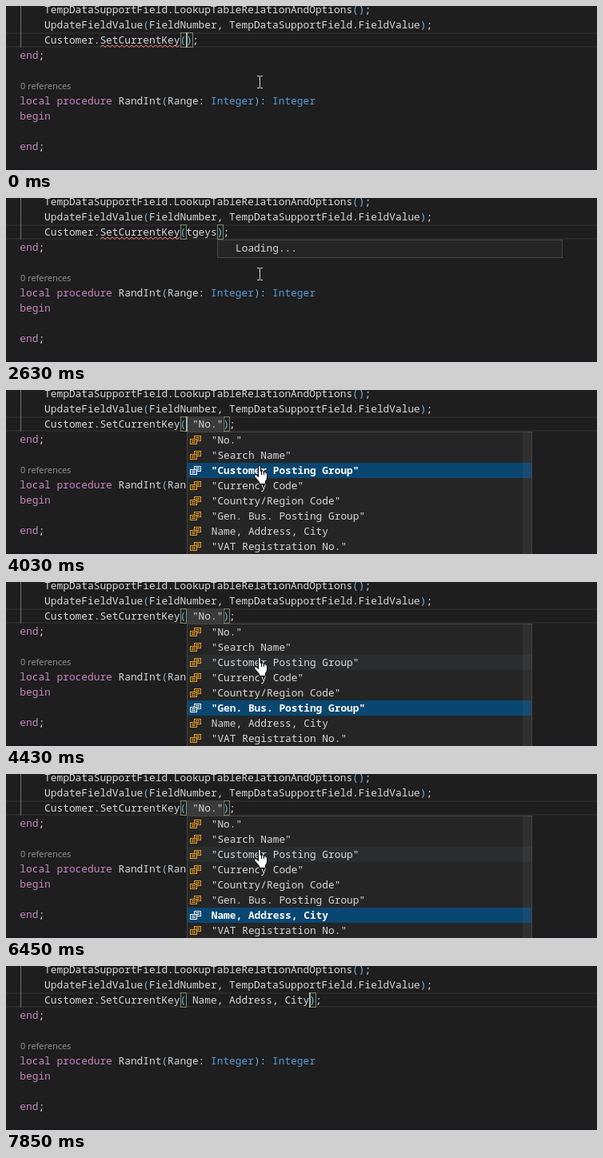
Write an HTML page with a canvas that moves like this. It is 739 px wide and 205 px high and loops after 8050 ms.

```html
<!DOCTYPE html>
<html lang="en">
<head>
<meta charset="utf-8">
<title>Code completion</title>
<style>
html, body { margin: 0; width: 100%; height: 100%; overflow: hidden; background: #1e1e1e; }
canvas { display: block; }
</style>
</head>
<body>
<canvas id="stage" width="739" height="205"></canvas>
<script>
const ctx = document.getElementById("stage").getContext("2d");
const LOOP = 8050, CHAR = 7.7, LEFT = 17.3, ROW = 19;
const MONO = '12.83px "Noto Sans Mono", "DejaVu Sans Mono", monospace';
const PLAIN = "#d8d8d8", KEYWORD = "#c586c0", TYPE = "#569cd6", PAREN = "#82b3dc";

const options = ['"No."', '"Search Name"', '"Customer Posting Group"', '"Currency Code"',
  '"Country/Region Code"', '"Gen. Bus. Posting Group"', "Name, Address, City",
  '"VAT Registration No."'];

// Each step changes part of the state at its time in ms.
const steps = [
  [0, { arg: "", caret: 27, on: true, squiggle: true, popup: "", selected: 0, pointer: "beam", at: [317, 87] }],
  [200, { arg: "t", caret: 28 }],
  [820, { on: false }],
  [1020, { arg: "tge", caret: 30, on: true }],
  [1220, { arg: "tgey", caret: 31 }],
  [1830, { on: false }],
  [2230, { arg: "tgeys", caret: 32, on: true, popup: "message" }],
  [2630, { on: false }],
  [3030, { arg: ' "No."', caret: 27, on: true, popup: "list", pointer: "hand", at: [310, 94] }],
  [3430, { on: false }],
  [3830, { selected: 1 }],
  [4030, { selected: 2, on: true, squiggle: false }],
  [4230, { selected: 3 }],
  [4430, { selected: 5, on: false }],
  [4830, { selected: 6, on: true }],
  [5030, { selected: 7 }],
  [5430, { selected: 6, on: false }],
  [5850, { on: true }],
  [6450, { on: false }],
  [6850, { pointer: "" }],
  [7050, { arg: " Name, Address, City", caret: 47, on: true, popup: "", pointer: "beam", at: [317, 87] }],
  [7450, { on: false }],
  [7650, { at: [399, 120] }],
  [7850, { on: true, pointer: "" }]
];

const stateAt = t => Object.assign({}, ...steps.filter(s => s[0] <= t).map(s => s[1]));
const colX = col => LEFT + col * CHAR;

function rect(x, y, w, h, color) {
  ctx.fillStyle = color;
  ctx.fillRect(x, y, w, h);
}

function frame(x, y, w, h, color) {
  ctx.strokeStyle = color;
  ctx.lineWidth = 1;
  ctx.strokeRect(x + 0.5, y + 0.5, w - 1, h - 1);
}

function polyline(points, color, width = 1) {
  ctx.beginPath();
  points.forEach(([x, y]) => ctx.lineTo(x, y));
  ctx.strokeStyle = color;
  ctx.lineWidth = width;
  ctx.stroke();
}

// Keeps every character on the monospace grid.
function mono(text, x, baseline, color, bold) {
  ctx.font = (bold ? "bold " : "") + MONO;
  ctx.fillStyle = color;
  [...text].forEach((c, i) => c !== " " && ctx.fillText(c, x + i * CHAR, baseline));
}

function colorOf(word) {
  if (/^(local|procedure|begin|end)$/.test(word)) return KEYWORD;
  if (word === "Integer") return TYPE;
  return /^[()]$/.test(word) ? PAREN : PLAIN;
}

function codeLine(text, top) {
  for (const m of text.matchAll(/\w+|[()]|[^\w()]+/g)) {
    mono(m[0], colX(m.index), top + 14, colorOf(m[0]));
  }
}

function bracketBox(col) {
  const x = Math.round(colX(col) + 0.3);
  rect(x, 33, 8, ROW, "rgba(0,100,0,0.1)");
  frame(x, 33, 8, ROW, "#808080");
}

function drawSquiggle() {
  const points = [];
  for (let x = 118, i = 0; x <= 218; x += 3, i++) points.push([x, i % 2 ? 49 : 51.5]);
  polyline(points, "#f48771");
}

function drawCode(s) {
  rect(0, 0, 739, 205, "#1e1e1e");
  rect(0, 202, 739, 3, "#1a1b1e");
  rect(0, 33, 739, 2, "#282828");
  rect(0, 50, 739, 2, "#282828");
  rect(18, 0, 1, 52, "#707070");

  if (s.arg.startsWith(' "')) rect(225, 33, 46, ROW, "#3a3a3a");
  if (s.squiggle) drawSquiggle();
  bracketBox(26);
  bracketBox(27 + s.arg.length);

  codeLine("    TempDataSupportField.LookupTableRelationAndOptions();", -5);
  codeLine("    UpdateFieldValue(FieldNumber, TempDataSupportField.FieldValue);", 14);
  codeLine(`    Customer.SetCurrentKey(${s.arg});`, 33);
  codeLine("end;", 52);
  ctx.font = '11px "Open Sans", "Noto Sans", sans-serif';
  ctx.fillStyle = "#999999";
  ctx.fillText("0 references", 18, 104);
  codeLine("local procedure RandInt(Range: Integer): Integer", 109);
  codeLine("begin", 128);
  codeLine("end;", 166);
  if (s.on) rect(Math.floor(colX(s.caret)), 33, 2, ROW, "#aeafad");
}

function drawIcon(top, color, back) {
  frame(235, top + 4, 9, 7, color);
  rect(237, top + 6, 5, 1, color);
  rect(237, top + 8, 5, 1, color);
  rect(230, top + 8, 9, 7, back);
  frame(230, top + 8, 9, 7, color);
  rect(232, top + 10, 5, 1, color);
  rect(232, top + 12, 5, 1, color);
}

function drawList(selected) {
  rect(226, 52, 432, 160, "#252526");
  frame(226, 52, 432, 160, "#454545");
  options.forEach((label, i) => {
    const top = 53 + i * ROW, active = i === selected;
    const back = active ? "#094771" : i === 2 ? "#2a2d2e" : "#252526";
    rect(227, top, 430, ROW, back);
    drawIcon(top, active ? "#ffffff" : "#ee9d28", back);
    mono(label, 256.7, top + 14, active ? "#ffffff" : PLAIN, active);
  });
  rect(646, 53, 11, 152, "rgba(121,121,121,0.12)");
}

function drawMessage() {
  rect(264, 52, 432, 23, "#252526");
  frame(264, 52, 432, 23, "#454545");
  mono("Loading...", 287, 67, PLAIN);
}

function drawBeam() {
  rect(0, 1, 1, 14, "#d8d8d8");
  for (const y of [0, 15]) {
    rect(-3, y, 3, 1, "#d8d8d8");
    rect(1, y, 3, 1, "#d8d8d8");
  }
}

function drawHand() {
  ctx.fillStyle = "#ffffff";
  ctx.strokeStyle = "#000000";
  ctx.lineWidth = 1;
  ctx.fill(handShape);
  ctx.stroke(handShape);
  for (const x of [9, 12]) polyline([[x + 0.5, 8], [x + 0.5, 12]], "#000000");
}

const handShape = new Path2D("M5.5 14.5V2Q5.5.5 7 .5T8.5 2V7.5Q11 6.5 11.7 8.3" +
  "Q14 7.5 14.5 9.3Q16.5 9 16.5 11V16Q16.5 18 14.5 20V23.5H6.5V21" +
  "L1 14.5Q0 12.5 1.8 11.8Q3 11.5 5.5 14.5Z");

function draw(now) {
  const s = stateAt(now % LOOP);
  drawCode(s);
  if (s.popup === "list") drawList(s.selected);
  if (s.popup === "message") drawMessage();
  if (s.pointer) {
    ctx.save();
    ctx.translate(...s.at);
    s.pointer === "hand" ? drawHand() : drawBeam();
    ctx.restore();
  }
}

const start = performance.now();
function tick() {
  draw(performance.now() - start);
  requestAnimationFrame(tick);
}
tick();
</script>
</body>
</html>
```
